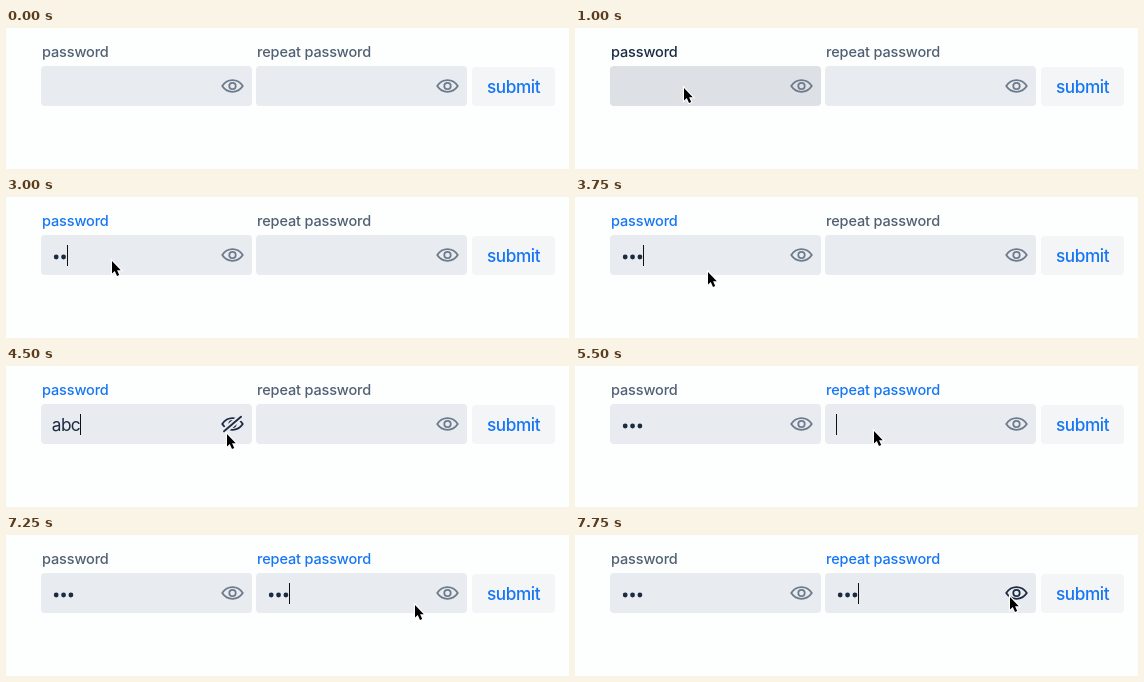
An HTML page for the animation above (8000 ms loop, 563 px wide and 141 px high).

```html
<!DOCTYPE html>
<html lang="en">
<head>
<meta charset="utf-8">
<title>Password form</title>
<style>
  html, body { margin: 0; width: 100%; height: 100%; overflow: hidden; background: #fdfefe; }
  svg { display: block; }
  text { font-family: Inter, "Open Sans", sans-serif; }
  .label { font-size: 14.5px; font-weight: 500; letter-spacing: -.01em; }
  .value { font-size: 17.3px; letter-spacing: -.035em; fill: #1b2b41; }
  .submit { font-size: 17.2px; font-weight: 500; letter-spacing: -.025em; fill: #1676f3; }
  .eye { fill: none; stroke-width: 1.8; stroke-linejoin: round; stroke-linecap: round; }
</style>
</head>
<body>
<svg width="563" height="141" viewBox="0 0 563 141">
  <g id="fields"></g>
  <rect x="466" y="39" width="83" height="39" rx="4" fill="#f3f5f7"/>
  <text class="submit" x="481" y="65">submit</text>
  <path id="pointer" d="M1 2V14.6L3.8 12L6 17L8.2 16L6.1 11.2H9.8Z"
        fill="#000" stroke="#fff" stroke-width="2.2" paint-order="stroke"/>
</svg>
<script>
const LOOP = 8000, STEP = 250, DOT_ADVANCE = 7.35;
const DARK = '#1b2b41', MUTED = '#516073', BLUE = '#1676f3', EYE = '#6c7a8b', FILL = '#e8ebf0';

// Each entry changes part of the state; everything else carries over.
const script = [
  [0,    { pointer: null, focus: -1, typed: [0, 0], caret: false, revealed: false }],
  [250,  { pointer: [122, 119] }],
  [500,  { pointer: [116, 88] }],
  [750,  { pointer: [110, 65] }],
  [1000, { pointer: [108, 58] }],
  [1250, { pointer: [105, 62] }],
  [1500, { focus: 0, caret: true }],
  [2000, { caret: false }],
  [2250, { typed: [1, 0], caret: true }],
  [3000, { typed: [2, 0] }],
  [3500, { typed: [3, 0] }],
  [3750, { pointer: [132, 73] }],
  [4000, { pointer: [188, 76] }],
  [4250, { pointer: [220, 66] }],
  [4500, { revealed: true }],
  [5000, { revealed: false }],
  [5250, { pointer: [276, 67] }],
  [5500, { pointer: [298, 63], focus: 1 }],
  [6000, { caret: false }],
  [6250, { typed: [3, 1], caret: true }],
  [6500, { typed: [3, 2] }],
  [6750, { typed: [3, 3] }],
  [7000, { pointer: [363, 69] }],
  [7250, { pointer: [408, 68] }],
  [7500, { pointer: [432, 63] }],
  [7750, { pointer: [434, 60] }],
];

const $ = id => document.getElementById(id);
const show = (node, on) => node.setAttribute('visibility', on ? 'visible' : 'hidden');

function createField(x, label) {
  const group = document.createElementNS('http://www.w3.org/2000/svg', 'g');
  group.setAttribute('transform', `translate(${x} 0)`);
  const dots = [0, 1, 2].map(i =>
    `<circle class="dot" cx="${15.2 + i * DOT_ADVANCE}" cy="60" r="2.4" fill="${DARK}"/>`).join('');
  group.innerHTML = `
    <text class="label" x="1" y="28.7">${label}</text>
    <rect class="box" y="38" width="211" height="40" rx="4"/>
    ${dots}
    <text class="value" x="10.8" y="65">abc</text>
    <rect class="caret" y="48" width="1" height="21" fill="#111"/>
    <g class="eye" transform="translate(191.5 58)">
      <path d="M-10.3 0C-5 -7.8 5 -7.8 10.3 0C5 7.8 -5 7.8 -10.3 0Z"/>
      <circle r="3.2"/>
      <g class="slash">
        <path d="M-7.5 6.5L7.5 -6.5" stroke="${FILL}" stroke-width="6"/>
        <path d="M-8.5 7.3L8.5 -7.3"/>
      </g>
    </g>`;
  $('fields').append(group);
  const find = name => group.querySelector('.' + name);
  return {
    x, dots: group.querySelectorAll('.dot'),
    label: find('label'), box: find('box'), value: find('value'),
    caret: find('caret'), eye: find('eye'), slash: find('slash'),
  };
}

const fields = [createField(35, 'password'), createField(250, 'repeat password')];

function drawField(field, index, state) {
  const [px, py] = state.pointer || [-100, -100];
  const dx = px - field.x;
  const hovered = dx >= 0 && dx <= 211 && py >= 38 && py <= 78;
  const focused = state.focus === index;
  const revealed = state.revealed && index === 0;
  const count = state.typed[index];

  field.label.setAttribute('fill', focused ? BLUE : hovered ? DARK : MUTED);
  field.box.setAttribute('fill', hovered && !focused ? '#dde0e5' : FILL);
  field.dots.forEach((dot, i) => show(dot, !revealed && i < count));
  show(field.value, revealed);
  field.caret.setAttribute('x', revealed ? 39 : 11 + Math.round(count * DOT_ADVANCE));
  show(field.caret, focused && state.caret);
  field.eye.setAttribute('stroke', hovered && dx >= 180 ? DARK : EYE);
  show(field.slash, revealed);
}

function render(now) {
  const time = Math.floor(now % LOOP / STEP) * STEP;
  const state = Object.assign({}, ...script.filter(([at]) => at <= time).map(([, change]) => change));
  fields.forEach((field, i) => drawField(field, i, state));
  show($('pointer'), state.pointer);
  if (state.pointer) $('pointer').setAttribute('transform', `translate(${state.pointer})`);
}

const start = performance.now();
function tick() {
  render(performance.now() - start);
  requestAnimationFrame(tick);
}
tick();
</script>
</body>
</html>
```
